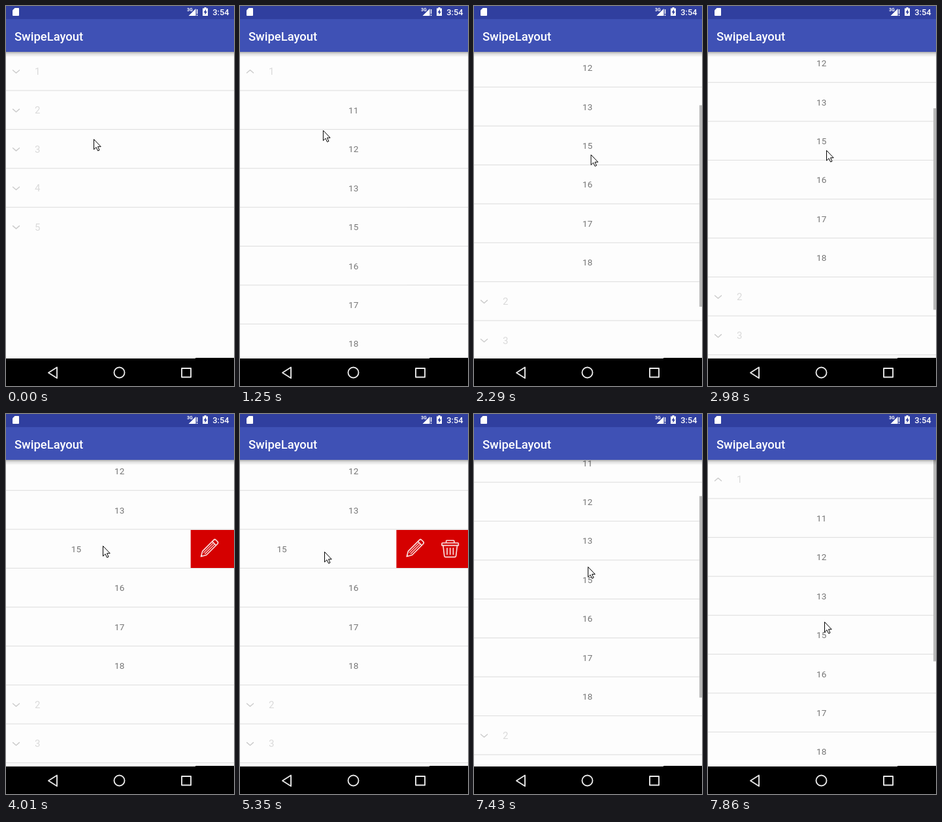
Animation of 349 by 580 pixels, one loop 8 s. Source, as an HTML page:

```html
<!DOCTYPE html>
<html lang="en">
<head>
<meta charset="utf-8">
<title>SwipeLayout</title>
<style>
html, body { margin: 0; width: 100%; height: 100%; overflow: hidden; background: #fdfdfd; }
svg { display: block; width: 349px; height: 580px; font-family: Roboto, sans-serif; }
.child { font-size: 13.5px; fill: #757575; text-anchor: middle; }
.group { font-size: 15px; fill: #dadada; }
.bar { font-weight: 500; fill: #fff; }
.line { fill: none; stroke-linejoin: round; stroke-linecap: round; }
</style>
</head>
<body>
<svg viewBox="0 0 349 580">
  <defs>
    <linearGradient id="shade" x2="0" y2="1">
      <stop offset="0" stop-opacity=".32"/>
      <stop offset=".4" stop-opacity=".12"/>
      <stop offset="1" stop-opacity="0"/>
    </linearGradient>
  </defs>
  <rect width="349" height="580" fill="#fdfdfd"/>
  <g id="list"></g>
  <rect id="thumb" x="345" width="4" height="307.5" fill="#b9b9b9"/>

  <rect y="70" width="349" height="8" fill="url(#shade)"/>
  <rect width="349" height="70" fill="#3f51b5"/>
  <rect width="349" height="20" fill="#303f9f"/>
  <text class="bar" x="13" y="52.6" font-size="18.4">SwipeLayout</text>
  <text class="bar" x="341.5" y="14" font-size="12.8" text-anchor="end">3:54</text>
  <g fill="#fff">
    <path d="M13.5 3H19Q20 3 20 4V14Q20 15 19 15H11Q10 15 10 14V6.5Z"/>
    <text x="277" y="8" font-size="7" font-weight="700">3G</text>
    <path d="M279.5 15L290.5 4V15ZM291.8 5H293.3V12H291.8ZM291.8 13.3H293.3V15H291.8Z"/>
    <path d="M301 3.500H303.500V2H306.500V3.500H309V15H301Z"/>
    <path d="M306 5L302.500 10H304.500V13.500L308 8.500H306Z" fill="#303f9f"/>
  </g>

  <path d="M0 538H290V537H349V580H0Z"/>
  <g class="line" stroke="#e8e8e8" stroke-width="1.9">
    <path d="M78 551.5V568L65 559.8Z"/>
    <circle cx="173.5" cy="559.5" r="8"/>
    <rect x="269" y="553" width="14" height="13.5"/>
  </g>
  <path id="cursor" d="M.5 .5V16L4 12.6L6.6 18L9 17L6.5 11.7H11.2Z" fill="#fff" stroke="#000"/>
</svg>
<script>
const PITCH = 59.4, TOP = 70, VIEW = 468, WIDTH = 349, LOOP = 8000;
const FIRST_ACTION = 66.3, BOTH_ACTIONS = 109.6, SCROLL = 131.2;
const $ = id => document.getElementById(id);
const move = (el, x, y) => el.setAttribute("transform", `translate(${x} ${y})`);

// Eased progress from 0 to 1 between two times
function ramp(t, from, to) {
  const p = Math.min(1, Math.max(0, (t - from) / (to - from)));
  return p * p * (3 - 2 * p);
}

// Pointer gestures: start, end, x, y
const gestures = [
  [100, 430, 121, 102],    // to the first row
  [980, 1640, 137, 340],
  [1690, 2390, 181, 220],  // drag the list up
  [2980, 3420, 215, 206],
  [3420, 4010, 148, 201],  // pull the row open
  [4450, 4710, 286, 210],
  [5050, 5350, 129, 210],
  [5800, 6310, 157, 210],  // push it back
  [6800, 7140, 172, 186],
  [7140, 7860, 178, 317]   // drag the list down
];

function pointer(t) {
  let x = 134, y = 203;
  for (const [from, to, toX, toY] of gestures) {
    const p = ramp(t, from, to);
    x += (toX - x) * p;
    y += (toY - y) * p;
  }
  return [x, y];
}

const divider = `<rect y="58.4" width="${WIDTH}" height="1.2" fill="#e1e1e1"/>`;
const actions = `<g id="actions">
  <rect y=".6" width="112" height="58" fill="#d50000"/>
  <g class="line" stroke="#f8dede" stroke-width="1.8">
    <g transform="translate(28 29) rotate(-45) scale(.93)">
      <path d="M-18.5 0L-10.5 -4.5H15Q18 -4.5 18 -2V2Q18 4.5 15 4.5H-10.5ZM12 -4.5V4.5"/>
      <path d="M-10.5 -1.5H11M-10.5 1.5H11M-18 0H-16" stroke-width="1.3"/>
    </g>
    <g transform="translate(82.3 29.3) scale(.94)">
      <path d="M-12.5 -9.500H12.500Q13.500 -9.500 13.500 -8.500V-5.500H-13.500V-8.500Q-13.500 -9.500 -12.500 -9.500ZM-6.500 -9.500V-12.500Q-6.500 -13.500 -5.500 -13.500H5.500Q6.500 -13.500 6.500 -12.500V-9.500"/>
      <path d="M-11.5 -5.500L-9.500 11.500Q-9.300 13.500 -7.500 13.500H7.500Q9.300 13.500 9.500 11.500L11.500 -5.500M-5 -1V9M0 -1V9M5 -1V9"/>
    </g>
  </g>
</g>`;

const groupRow = n => `<g>${n < 5 ? divider : ""}
  <path class="line chevron" d="M10.5 28L15.5 32.3L20.5 28" stroke="#cbcbcb" stroke-width="1.4"/>
  <text class="group" x="44" y="35">${n}</text></g>`;
const childRow = n => `<g>${divider}
  <text class="child" x="173.7" y="34.5">${n}</text>${n === 15 ? actions : ""}</g>`;

const children = [11, 12, 13, 15, 16, 17, 18];
const list = $("list");
list.innerHTML = groupRow(1) + children.map(childRow).join("") + [2, 3, 4, 5].map(groupRow).join("");
const rows = [...list.children];
const chevron = list.querySelector(".chevron");
const swiped = rows[1 + children.indexOf(15)].querySelector("text");

function draw(t) {
  const open = ramp(t, 780, 1030);
  const scroll = SCROLL * (ramp(t, 1690, 2390) - ramp(t, 7140, 7860));
  // Drags follow the pointer; on release the row snaps open or shut
  const pulled = FIRST_ACTION * ramp(t, 3420, 4010);
  const snapped = (BOTH_ACTIONS - FIRST_ACTION) * ramp(t, 4140, 4180);
  const pushed = 38.3 * ramp(t, 5800, 6310);
  const slide = (pulled + snapped - pushed) * (1 - ramp(t, 6420, 6460));

  rows.forEach((row, i) => {
    const slot = i > children.length ? i - children.length * (1 - open) : i;
    move(row, 0, TOP + slot * PITCH - scroll);
    if (i > 0 && i <= children.length) row.setAttribute("opacity", ramp(t, 980, 1280));
  });
  chevron.setAttribute("transform", `rotate(${180 * open} 15.5 30)`);
  move(swiped, -slide, 0);
  move($("actions"), WIDTH - slide, 0);
  $("thumb").setAttribute("y", TOP + scroll * VIEW / (rows.length * PITCH));
  $("thumb").setAttribute("opacity", ramp(t, 1740, 1890) - ramp(t, 2980, 3280) + ramp(t, 7140, 7280));
  move($("cursor"), ...pointer(t));
}

const start = performance.now();
function tick() {
  draw((performance.now() - start) % LOOP);
  requestAnimationFrame(tick);
}
tick();
</script>
</body>
</html>
```
